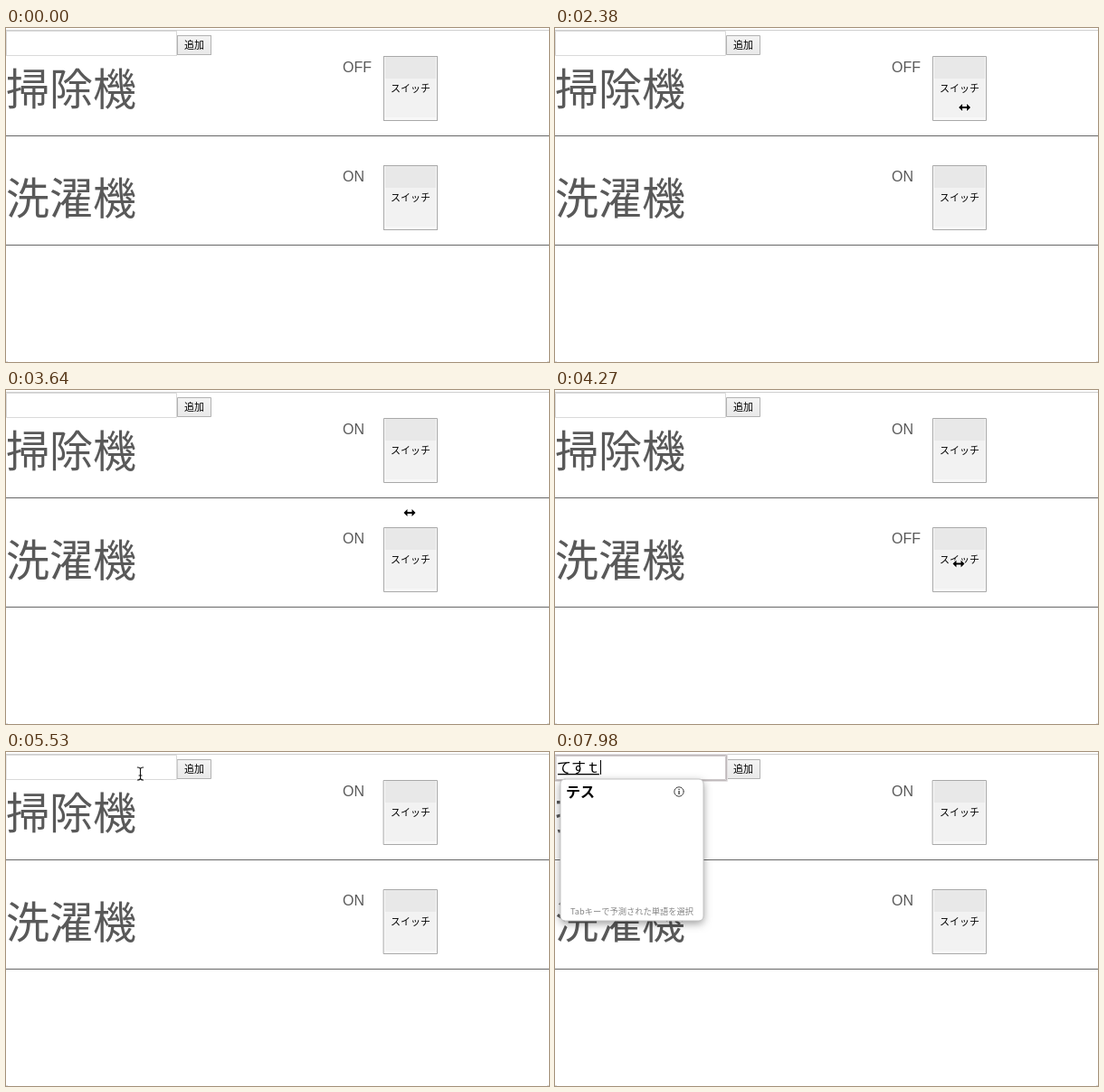
Recreate the animation shown at these times as an HTML page with a canvas. Size 600 by 370 pixels, loop 8 s.

```html
<!DOCTYPE html>
<html lang="ja">
<head>
<meta charset="utf-8">
<style>
html, body { margin: 0; width: 100%; height: 100%; overflow: hidden; background: #fff; }
canvas { display: block; width: 600px; height: 370px; }
</style>
</head>
<body>
<canvas id="stage" width="600" height="370"></canvas>
<script>
const g = document.getElementById('stage').getContext('2d');
const LOOP = 8000, STEP = 70;
const CJK = '"Noto Sans CJK JP", "Noto Sans CJK", sans-serif';
const LATIN = '"Liberation Sans", Arial, sans-serif';

// pointer stops: time, x, y
const PATH = [
  [350, 283, 327], [490, 263, 248], [770, 263, 248], [1400, 453, 88],
  [2310, 453, 88], [2800, 446, 79], [3430, 446, 79], [3850, 446, 192],
  [4900, 446, 192], [5530, 148, 24], [LOOP, 148, 24]
];
const TYPED = [[7350, 'ｔ'], [7490, 'て'], [7700, 'てｓ'], [7840, 'てす'], [7980, 'てすｔ']];
const FOCUS = 5600, TYPING = 7350, POPUP = 7700;

const within = (t, a, b) => t >= a && t < b;

function rect(x, y, w, h, fill) {
  g.fillStyle = fill;
  g.fillRect(x, y, w, h);
}

function frame(x, y, w, h, color) {
  g.strokeStyle = color;
  g.lineWidth = 1;
  g.strokeRect(x + 0.5, y + 0.5, w - 1, h - 1);
}

function text(s, x, y, font, color, align = 'left') {
  g.font = font;
  g.fillStyle = color;
  g.textAlign = align;
  g.fillText(s, x, y);
}

function shade(y, h, ...colors) {
  const fill = g.createLinearGradient(0, y, 0, y + h);
  colors.forEach((c, i) => fill.addColorStop(i / (colors.length - 1), c));
  return fill;
}

function polygon(points, x, y) {
  g.beginPath();
  for (let i = 0; i < points.length; i += 2) g.lineTo(x + points[i], y + points[i + 1]);
  g.closePath();
  g.lineJoin = 'round';
  g.lineWidth = 2;
  g.strokeStyle = '#fff';
  g.stroke();
  g.fillStyle = '#000';
  g.fill();
}

function switchButton(y, pressed) {
  if (pressed) {
    rect(417, y, 60, 72, shade(y, 72, '#acacac', '#b5b5b5', '#b3b3b3'));
    frame(417, y, 60, 72, '#9c9c9c');
  } else {
    rect(417, y, 60, 72, '#f8f8f8');
    rect(419, y + 1, 56, 24, '#e8e8e8');
    rect(419, y + 25, 56, 43, '#f2f2f2');
    frame(417, y, 60, 72, '#a9a9a9');
  }
  text('スイッチ', 447, y + 39.5, '500 11px ' + CJK, '#000', 'center');
}

function row(y, name, on, pressed) {
  text(name, 0, y + 53.5, '350 48px ' + CJK, '#595959');
  text(on ? 'ON' : 'OFF', 372, y + 17.5, '16px ' + LATIN, '#595959');
  switchButton(y, pressed);
  rect(0, y + 88, 600, 1, '#666');
}

function popup() {
  g.save();
  g.shadowColor = 'rgba(0,0,0,0.4)';
  g.shadowBlur = 10;
  g.shadowOffsetY = 3;
  g.fillStyle = '#fff';
  g.beginPath();
  g.roundRect(6, 30, 158, 157, 5);
  g.fill();
  g.restore();
  g.strokeStyle = '#c4c4c4';
  g.lineWidth = 1;
  g.stroke();
  text('テス', 12, 49.5, 'bold 16px ' + CJK, '#000');
  g.beginPath();
  g.arc(137, 44, 5.2, 0, 7);
  g.strokeStyle = '#444';
  g.stroke();
  rect(136.4, 43, 1.3, 4, '#333');
  rect(136.4, 40.8, 1.3, 1.3, '#333');
  text('Tabキーで予測された単語を選択', 85, 179.5, '9.25px ' + CJK, '#858585', 'center');
}

function input(t) {
  const focused = t >= FOCUS, typing = t >= TYPING;
  rect(0, 3, 189, 28, '#fff');
  if (!focused) {
    frame(0, 3, 189, 28, '#d9d9d9');
    return;
  }
  const rings = typing ? ['#e2dfe0', '#bfb9bb', '#cdc8ca'] : ['#c3d9f3', '#7ea9de', '#a9c8ee'];
  rings.forEach((c, i) => frame(i - 1, 2 + i, 192 - 2 * i, 31 - 2 * i, c));

  let typed = '';
  for (const [at, s] of TYPED) if (t >= at) typed = s;
  const end = 2 + typed.length * 16;
  if (typed) {
    text(typed, 2, 22.5, '16px ' + CJK, '#000');
    rect(3, 24, end - 4, 1.3, '#000');
  }
  const blink = within(t, FOCUS, 6160) || within(t, 6650, 7210);
  if (typing || blink) rect(end, 9, 1, 16, '#000');
}

function beam(x, y) {
  g.lineCap = 'round';
  for (const [w, c] of [[2.6, '#fff'], [1.1, '#111']]) {
    g.beginPath();
    g.moveTo(x, y - 5);
    g.lineTo(x, y + 5);
    for (const side of [-1, 1]) {
      for (const end of [-1, 1]) {
        g.moveTo(x + side * 3.2, y + end * 7);
        g.quadraticCurveTo(x, y + end * 7, x, y + end * 5);
      }
    }
    g.moveTo(x - 1.5, y + 2);
    g.lineTo(x + 1.5, y + 2);
    g.lineWidth = w;
    g.strokeStyle = c;
    g.stroke();
  }
}

function pointer(t) {
  if (t < PATH[0][0] || t >= TYPING) return;
  const i = PATH.findIndex(p => p[0] > t);
  const [t0, x0, y0] = PATH[i - 1], [t1, x1, y1] = PATH[i];
  const k = (t - t0) / (t1 - t0), e = k * k * (3 - 2 * k);
  const x = x0 + (x1 - x0) * e, y = y0 + (y1 - y0) * e;

  if (x < 188 && y < 32) {
    beam(x + 0.5, y);
  } else if (t >= 1820 && x > 417) {
    polygon([-6.5, 0.5, -2.5, -3.5, -2.5, -0.4, 2.5, -0.4, 2.5, -3.5, 6.5, 0.5,
      2.5, 4.5, 2.5, 1.4, -2.5, 1.4, -2.5, 4.5], x, y);
  } else {
    polygon([0.5, 0.5, 0.5, 13.5, 3.4, 10.8, 5.6, 16, 7.9, 15, 5.7, 10, 9.6, 10], x, y);
  }
}

function draw(t) {
  rect(0, 0, 600, 370, '#fff');
  rect(0, 2, 600, 1, '#cfcfcf');
  rect(0, 369, 2, 1, '#ddd');
  rect(598, 369, 2, 1, '#ddd');

  row(31, '掃除機', t >= 2940, within(t, 2870, 2940));
  row(152, '洗濯機', !within(t, 4060, 4690), within(t, 3990, 4060) || within(t, 4550, 4690));

  rect(189, 8, 38, 22, shade(8, 22, '#f4f4f4', '#e9e9e9'));
  frame(189, 8, 38, 22, '#b2b2b2');
  text('追加', 208, 23, '500 11px ' + CJK, '#000', 'center');

  input(t);
  if (t >= POPUP) popup();
  pointer(t);
}

const start = performance.now();
function tick() {
  const t = (performance.now() - start) % LOOP;
  draw(Math.floor(t / STEP) * STEP);
  requestAnimationFrame(tick);
}
tick();
</script>
</body>
</html>
```
